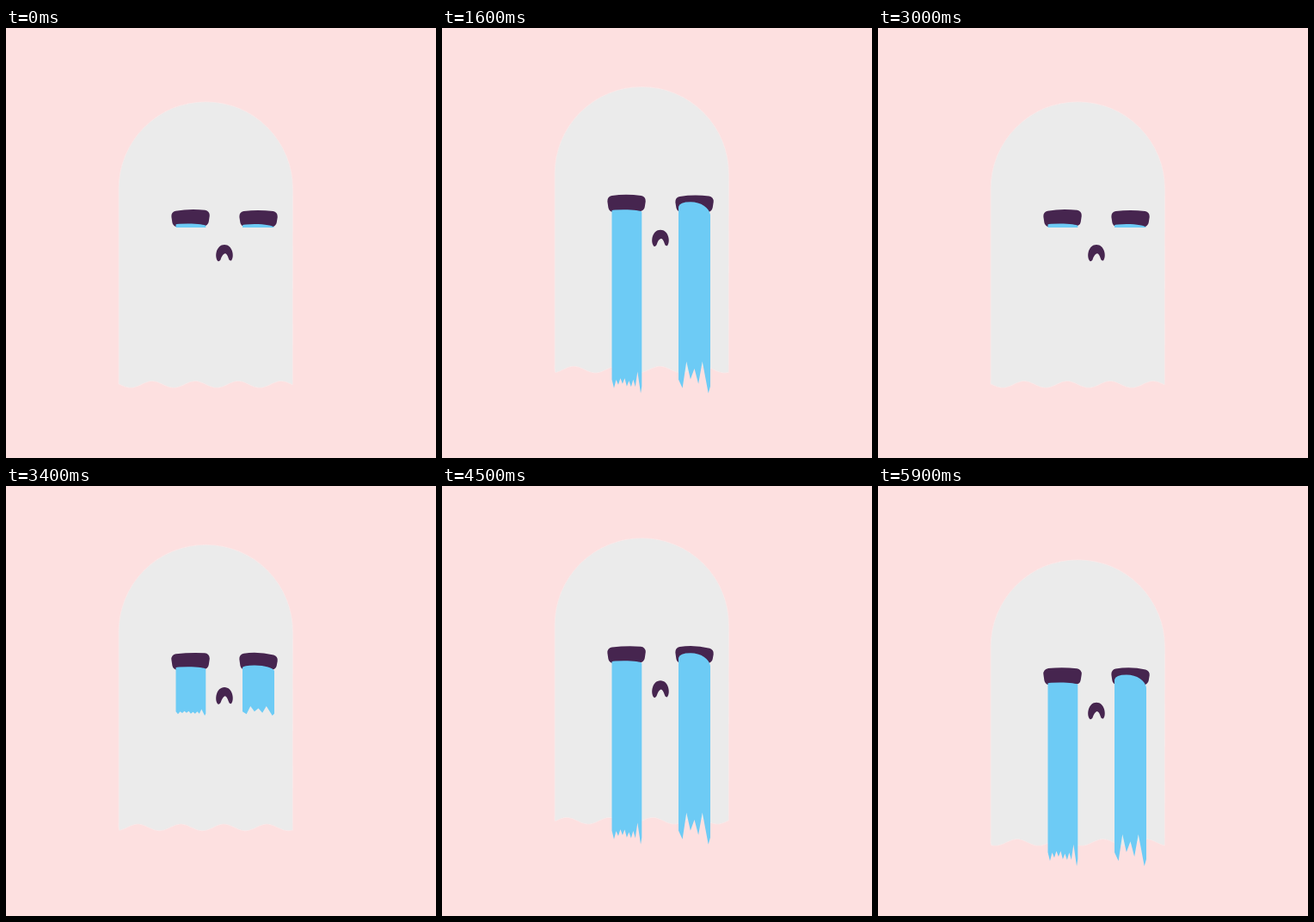
An HTML page with a canvas that plays this animation: 500 px wide and 500 px high, repeating every 6 s.

```html
<!DOCTYPE html>
<html lang="en">
<head>
<meta charset="utf-8">
<title>Crying ghost</title>
<style>
  html, body { margin: 0; width: 100%; height: 100%; overflow: hidden; background: #fde0e0; }
  canvas { display: block; width: 500px; height: 500px; }
</style>
</head>
<body>
<canvas id="stage" width="500" height="500"></canvas>
<script>
const ctx = document.getElementById('stage').getContext('2d');
const LOOP = 6000, CYCLE = 3000, STEP = 100;
const BG = '#fde0e0', BODY = '#ebebeb', DARK = '#46254f', TEAR = '#6dcbf5';
const PEAK = 1100, SETTLED = 2400, FLOW_TIME = 1200, FLOW_LENGTH = 210;

// Steps that repeat the pose before them.
const HELD = new Set([1, 17, 19, 25, 29, 31, 49, 53, 55]);

// The ghost floats up softly, then drops quickly and settles.
function lift(t) {
  if (t >= SETTLED) return 0;
  if (t < PEAK) return 40 * Math.sin(Math.PI / 2 * t / PEAK) ** 1.35;
  return 41 / (1 + ((t - PEAK) / 470) ** 3.5) - 1;
}

const easeInOut = u => 0.5 - 0.5 * Math.cos(Math.PI * Math.min(1, u));

// Small hand-drawn wobble that changes from step to step.
const boil = (n, seed) => 0.6 * Math.sin(n * 2.3 + seed * 1.7);

function randomFrom(seed) {
  return () => (seed = (seed * 16807) % 2147483647) / 2147483647;
}

function drawBody(t) {
  const p = new Path2D();
  p.moveTo(131.5, 414);
  p.lineTo(131.5, 187);
  p.arc(232.3, 187, 100.8, Math.PI, 0);
  for (let x = 333; x >= 131.5; x -= 1.5) {
    p.lineTo(x, 414 + 3.8 * Math.cos((x - 145 - t / 12) * Math.PI / 25));
  }
  p.closePath();
  ctx.strokeStyle = '#f8e9e9';
  ctx.lineWidth = 1.6;
  ctx.stroke(p);
  ctx.fillStyle = BODY;
  ctx.fill(p);
}

function drawEye(x, n, droop) {
  const a = boil(n, x), b = boil(n, x + 3);
  const p = new Path2D();
  p.moveTo(x + 6, 218.5 + a);
  p.quadraticCurveTo(x + 22, 216.3 + b, x + 38.5, 217.8 + droop - a);
  p.lineTo(x + 37.5, 224.5 + droop / 2);
  p.quadraticCurveTo(x + 22, 224, x + 7, 225.3);
  p.closePath();
  ctx.fillStyle = ctx.strokeStyle = DARK;
  ctx.lineWidth = 12;
  ctx.lineJoin = 'round';
  ctx.fill(p);
  ctx.stroke(p);
}

// A brush stroke whose lower edge splits into strands; the last strand is longest.
function drawTear({ left, right, strands, slot, seed }, top, dome, grow) {
  const random = randomFrom(seed);
  const end = 232 + FLOW_LENGTH * grow;
  const rag = Math.min(1, grow * 1.2);
  const width = (right - left) / strands;
  const p = new Path2D();
  p.moveTo(right, top + dome * 1.3);
  p.bezierCurveTo(right - 1, top + dome * 0.6, left + 26, top, left + 14, top);
  p.quadraticCurveTo(left + 1, top, left, top + dome * 0.5);
  p.lineTo(left, end - 16 * rag);
  for (let i = 1; i <= strands; i++) {
    const x = left + i * width;
    const last = i === strands;
    const drip = last ? 0 : 6 + slot * 0.35 * random();
    const gap = slot * (0.75 + 0.5 * random()) * (i === strands - 1 ? 1.25 : 1);
    p.lineTo(x - width * (last ? 0.25 : 0.5), end - drip * rag);
    p.lineTo(x, end - (last ? 8 : gap) * rag);
  }
  p.closePath();
  ctx.fillStyle = TEAR;
  ctx.fill(p);
}

function drawMouth(n) {
  const a = boil(n, 5) * 0.6;
  const p = new Path2D();
  p.moveTo(246.3, 271);
  p.bezierCurveTo(242, 266, 244.5, 251.8 + a, 254, 251.8 + a);
  p.bezierCurveTo(263.5, 251.8 + a, 266, 266, 262, 270.5);
  p.quadraticCurveTo(259.5, 271, 258.8, 268);
  p.quadraticCurveTo(257, 262, 254.5, 262 + a);
  p.quadraticCurveTo(251.5, 263, 249.5, 269.5);
  p.quadraticCurveTo(248, 272, 246.3, 271);
  ctx.fillStyle = DARK;
  ctx.fill(p);
}

const LEFT_TEAR = { left: 197.5, right: 232.3, strands: 7, slot: 17, seed: 71 };
const RIGHT_TEAR = { left: 275, right: 312, strands: 4, slot: 32, seed: 29 };

function draw(ms) {
  let n = Math.floor((ms % LOOP) / STEP);
  if (HELD.has(n)) n--;
  const t = (n * STEP) % CYCLE;
  const grow = easeInOut(t / FLOW_TIME);

  ctx.setTransform(1, 0, 0, 1, 0, 0);
  ctx.filter = 'none';
  ctx.fillStyle = BG;
  ctx.fillRect(0, 0, 500, 500);
  ctx.translate(0, -lift(t));
  drawBody(t);
  ctx.filter = 'blur(0.6px)';
  drawEye(192.3, n, 0);
  drawEye(271.3, n, 1.5);
  drawTear(LEFT_TEAR, 227.5 + grow, 2, grow);
  drawTear(RIGHT_TEAR, 228 - 8.5 * grow, 3 + 8.5 * grow, grow);
  drawMouth(n);
}

const start = performance.now();
function tick() {
  draw(performance.now() - start);
  requestAnimationFrame(tick);
}
tick();
</script>
</body>
</html>
```
